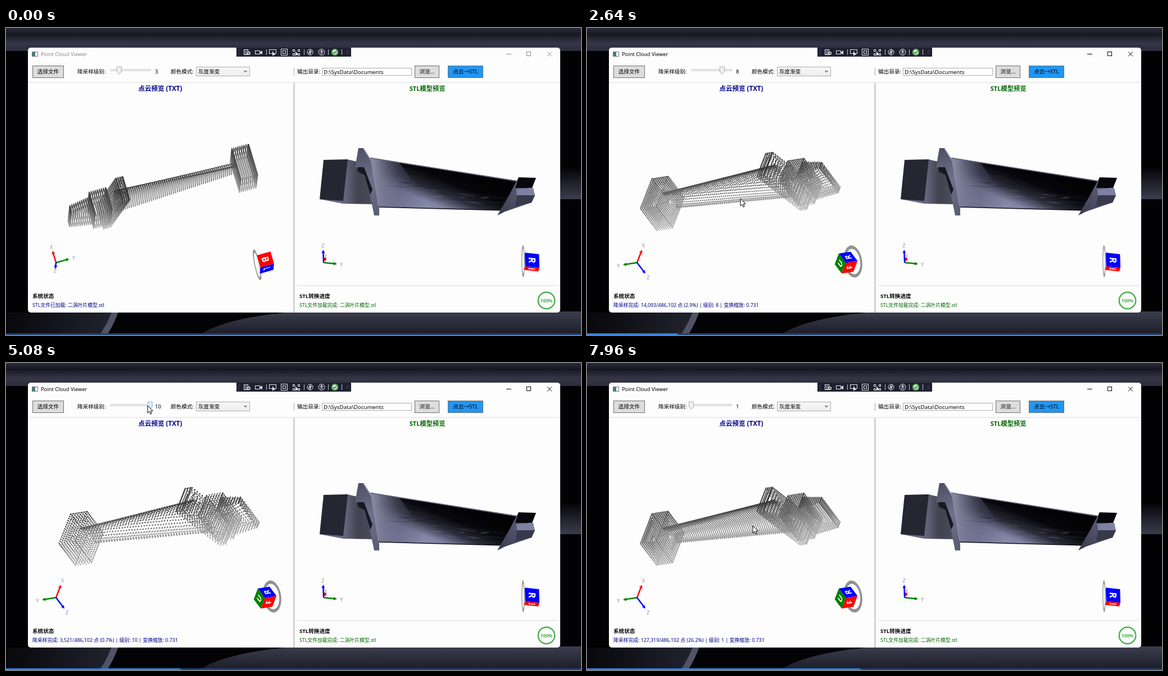
Recreate the animation shown at these times as an HTML page with a canvas. Size 1023 by 547 pixels, loop 8 s.

```html
<!DOCTYPE html>
<html lang="zh">
<head>
<meta charset="utf-8">
<title>Point Cloud Viewer</title>
<style>
html,body{margin:0;width:100%;height:100%;overflow:hidden;background:#020204}
canvas{display:block;width:1023px;height:547px}
</style>
</head>
<body>
<canvas id="stage" width="1023" height="547"></canvas>
<script>
let c = document.getElementById('stage').getContext('2d');
const LOOP = 8000, FONT = '"Noto Sans","Noto Sans CJK SC","Noto Sans CJK",sans-serif';
const NAVY = '#00008b', GREEN = '#006400', TAU = Math.PI * 2;

// ---------- helpers ----------
const mix = (a, b, k) => a + (b - a) * k;
const mixAll = (a, b, k) => a.map((v, i) => mix(v, b[i], k));
const clamp = (v, lo, hi) => Math.max(lo, Math.min(hi, v));
const ramp = (t, a, b) => { const k = clamp((t - a) / (b - a), 0, 1); return k * k * (3 - 2 * k); };

function text(s, x, y, size = 9.6, color = '#000', weight = 400, align = 'left') {
  c.font = `${weight} ${size}px ${FONT}`;
  c.textAlign = align;
  c.fillStyle = color;
  c.fillText(s, x, y);
}
function path(p, closed = true) {
  c.beginPath();
  for (let i = 0; i < p.length; i += 2) c.lineTo(p[i], p[i + 1]);
  if (closed) c.closePath();
}
function poly(p, fill) { path(p); c.fillStyle = fill; c.fill(); }
function line(p, color, w = 1) {
  path(p, false);
  c.strokeStyle = color; c.lineWidth = w; c.stroke();
}
function rect(x, y, w, h, fill) { c.fillStyle = fill; c.fillRect(x, y, w, h); }
function frame(x, y, w, h, color) {
  c.strokeStyle = color; c.lineWidth = 1;
  c.strokeRect(x + .5, y + .5, w - 1, h - 1);
}
function box(x, y, w, h, fill, edge) { rect(x, y, w, h, fill); frame(x, y, w, h, edge); }
function circle(x, y, r, color, w) {
  c.beginPath(); c.arc(x, y, r, 0, TAU);
  c.strokeStyle = c.fillStyle = color;
  if (w) { c.lineWidth = w; c.stroke(); } else c.fill();
}
function grad(x0, y0, x1, y1, ...cols) {
  const g = c.createLinearGradient(x0, y0, x1, y1);
  cols.forEach((v, i) => g.addColorStop(i / (cols.length - 1), v));
  return g;
}

// ---------- timeline ----------
// stops of the pointer: leave time, arrive time, x, y
const MOVES = [[60, 800, 205, 77], [1280, 1600, 244, 78], [2120, 2560, 273, 304], [2680, 3320, 248, 215],
  [3320, 3640, 225, 54], [3700, 3860, 242, 76], [3860, 4080, 252, 76], [5140, 5800, 220, 73],
  [6080, 6480, 182, 73], [6760, 7120, 141, 92], [7200, 7560, 182, 90], [7560, 7960, 295, 290]];
const pointerAt = t => MOVES.reduce((p, [a, b, x, y]) => mixAll(p, [x, y], ramp(t, a, b)), [582, 330]);
// start, end, level and points left of each downsampling run
const RUNS = [[1360, 2040, 8, 14093], [4040, 4600, 10, 3521], [5240, 5640, 7, 24305], [5760, 6200, 6, 36517],
  [6280, 6680, 1, 127319]];
const TOTAL = 486102;
const sliderLevel = t => Math.round(3 + 5 * ramp(t, 1280, 1600) + 2 * ramp(t, 3860, 4080)
  - 4 * ramp(t, 5160, 5800) - 5 * ramp(t, 6080, 6480));
const spin = t => t < 4600 ? ramp(t, 2680, 3320) : 0;

// ---------- views: screen vectors of the X, Y and Z axes ----------
const SIDE = [-.25, -.84, .95, -.26, -.05, .45];
const HOME = [.29, -.75, -.82, .13, .49, .65];
const TURNED = [.28, .1, -.85, .45, .44, .88];
const SOLID = [.08, -.25, 1, .1, -.03, -.96];
const project = (m, x, y, z) => [m[0] * x + m[2] * y + m[4] * z, m[1] * x + m[3] * y + m[5] * z];
const toward = ([a, b, d, e, g, h]) => [g * e - d * h, a * h - g * b, d * b - a * e];

// ---------- point cloud of a turbine blade along Y ----------
// y range, half thickness in x at both ends, z range, slant of y over z
const BOXES = [[-190, -145, 7, 15, -34, 34, 0], [-145, -110, 25, 25, -34, 34, 0],
  [-110, -95, 28, 28, -58, 42, -.35], [155, 190, 36, 36, -32, 28, 0]];
function square(u) {
  const e = u * 4 % 1 * 2 - 1;
  return [[e, 1], [1, -e], [-e, -1], [-1, e]][u * 4 | 0];
}
function bladePoints(level) {
  const pts = [], dy = 4.2 + Math.max(0, level - 8) * .8, ds = 1.2 + .33 * level;
  const loop = (length, put) => {
    const n = Math.max(4, Math.round(length / ds));
    for (let i = 0; i < n; i++) pts.push(put(i / n));
  };
  for (let y = -95; y < 155; y += dy) {
    const k = (y + 95) / 250, mid = mix(-9, -5, k), half = mix(38, 24, k);
    loop(half * 4, u => {
      const w = Math.cos(u * TAU);
      return [Math.sin(u * TAU) * 4 + 11 * (1 - w * w) + w * 9 * (k - .5), y, mid + half * w];
    });
  }
  for (const [y0, y1, x0, x1, z0, z1, slant] of BOXES) {
    const ring = (k, s) => loop(4 * s * mix(x0, x1, k) + 2 * s * (z1 - z0), u => {
      const [a, b] = square(u), z = (z0 + z1) / 2 + b * s * (z1 - z0) / 2;
      return [a * s * mix(x0, x1, k), mix(y0, y1, k) + slant * z, z];
    });
    for (let y = y0; y <= y1; y += dy) ring((y - y0) / (y1 - y0), 1);
    for (let s = .15; s < 1; s += dy / 36) { ring(0, s); ring(1, s); }
  }
  return pts;
}
function paintCloud(level, m, scale) {
  const n = toward(m), r = 1.25 + level * .075;
  bladePoints(level)
    .map(p => [p, n[0] * p[0] + n[1] * p[1] + n[2] * p[2]])
    .sort((a, b) => a[1] - b[1])
    .forEach(([[x, y, z]]) => {
      const g = Math.round(clamp(115 + 1.3 * z - .5 * x, 45, 172) / 6) * 6;
      const [px, py] = project(m, x * scale, y * scale, z * scale);
      c.fillStyle = `rgb(${g},${g},${g})`;
      c.fillRect(276 + px - r / 2, 291 + py - r / 2, r, r);
    });
}
const layer = document.createElement('canvas');
layer.width = 1023; layer.height = 547;
let layerKey = '';
function cloud(level, m, scale) {
  const key = [level, ...m].join();
  if (key !== layerKey) {
    const main = c;
    c = layer.getContext('2d');
    c.clearRect(0, 0, 1023, 547);
    paintCloud(level, m, scale);
    c = main;
    layerKey = key;
  }
  c.drawImage(layer, 0, 0);
}

// ---------- axes and view cube ----------
function axes(ox, oy, m, size) {
  ['#f00', '#008000', '#00f'].forEach((col, i) => {
    const [dx, dy] = [m[i * 2], m[i * 2 + 1]], len = Math.hypot(dx, dy), tip = size * len;
    const ux = dx / len, uy = dy / len, neck = Math.max(0, tip - 6);
    const at = (d, side) => [ox + ux * d - uy * side, oy + uy * d + ux * side];
    line([ox, oy, ...at(neck, 0)], col, 2.4);
    if (len < .35) circle(...at(tip, 0), 3, col);
    else poly([...at(tip, 0), ...at(neck, 3), ...at(neck, -3)], col);
    const [lx, ly] = at(Math.max(tip * 1.32, 12), 0);
    text('XYZ'[i], lx, ly + 3.5, 9.6, '#999', 400, 'center');
  });
}
// letter, colour, normal and letter-up direction of each face
const FACES = [['R', '#00f', [1, 0, 0], [0, 1, 0]], ['L', '#00f', [-1, 0, 0], [0, 1, 0]],
  ['U', '#008000', [0, 1, 0], [0, 0, -1]], ['F', '#f00', [0, 0, 1], [0, 1, 0]], ['B', '#f00', [0, 0, -1], [0, 1, 0]]];
const cross = (a, b) => [0, 1, 2].map(i => a[(i + 1) % 3] * b[(i + 2) % 3] - a[(i + 2) % 3] * b[(i + 1) % 3]);
function cube(ox, oy, m) {
  const half = 12.7, eye = toward(m);
  c.beginPath();
  for (const r of [23, 28.5]) {
    for (let i = 0; i <= 48; i++) {
      const a = i / 48 * TAU, [x, y] = project(m, r * Math.cos(a), -15, r * Math.sin(a));
      i ? c.lineTo(ox + x, oy + y) : c.moveTo(ox + x, oy + y);
    }
  }
  c.fillStyle = c.strokeStyle = '#919191'; c.lineWidth = .6;
  c.fill('evenodd'); c.stroke();
  for (const [letter, color, normal, up] of FACES) {
    if (normal.reduce((s, v, i) => s + v * eye[i], 0) <= 0) continue;
    c.save();
    const [x, y] = project(m, ...normal), right = project(m, ...cross(up, normal)), top = project(m, ...up);
    c.transform(right[0], right[1], -top[0], -top[1], ox + x * half, oy + y * half);
    rect(-half, -half, half * 2, half * 2, color);
    text(letter, 0, 6.2, 17, '#fff', 700, 'center');
    c.restore();
  }
}

// ---------- solid model ----------
function model() {
  let seed = 7;
  const rnd = () => (seed = seed * 16807 % 2147483647) / 2147483647;
  poly([558,305, 607,234, 624,238, 642,250, 655,314, 600,313], grad(602, 0, 650, 0, '#666880', '#42434f', '#4a4b5c'));
  poly([565,235, 608,234, 600,308, 558,305], '#242632');
  const foil = [648,231, 915,273, 890,325, 664,319];
  poly(foil, grad(776, 246, 742, 330, '#030305', '#08080c', '#2a2b38', '#8183a4', '#9294b6'));
  c.save();
  path(foil); c.clip();
  poly([648,231, 700,240, 760,325, 664,319], grad(655, 0, 745, 0, '#84869f', 'rgba(80,82,108,.5)', 'rgba(60,62,84,0)'));
  for (let i = 0; i < 60; i++) {
    const k = rnd(), x = mix(665, 860, rnd()), y = mix(250 + (x - 665) * .17, 312, k), len = 15 + rnd() * 55;
    poly([x, y, x + len, y + len * .07, x + len * .6, y + 2.4], k < .5 ? 'rgba(5,5,9,.75)' : 'rgba(128,130,164,.4)');
  }
  c.restore();
  line([648, 231.5, 915, 274], '#62647a', 1.5);
  line([664, 319, 889, 325], '#101018', 1.5);
  poly([627,214, 636,214, 650,236, 664,317, 664,334, 655,334, 638,252, 621,248],
    grad(620, 214, 664, 330, '#4b4d61', '#6f718b', '#5b5d75'));
  poly([625,248, 637,248, 652,288, 648,297, 638,262, 626,256], '#171820');
  line([636, 215, 650, 237, 663, 317], '#8c8eae', 1.5);
  poly([912,266, 941,298, 935,311, 888,327, 874,334, 895,298], grad(880, 330, 925, 285, '#3b3c4e', '#5e607c'));
  poly([912,266, 943,267, 936,285, 906,285], '#08080c');
  poly([908,287, 938,285, 941,298, 909,298], '#7f81a2');
  poly([909,298, 941,298, 935,311, 906,318], '#38394a');
}

// ---------- desktop and window ----------
function desktop() {
  rect(0, 0, 1023, 547, '#020204');
  rect(0, 0, 1023, 13, grad(0, 0, 0, 13, '#2a2c3a', '#14151d'));
  rect(0, 13, 1023, 28, grad(0, 13, 0, 41, '#1b1c27', '#343646', '#2b2d3b'));
  rect(986, 250, 37, 55, grad(0, 250, 0, 305, '#050508', '#3b3d4e'));
  rect(0, 507, 190, 40, grad(0, 0, 185, 0, '#08080c', '#20222d'));
  c.beginPath(); c.moveTo(196, 500); c.quadraticCurveTo(188, 525, 172, 549);
  c.lineTo(360, 549); c.quadraticCurveTo(400, 515, 520, 500);
  c.fillStyle = '#030305'; c.fill();
  c.beginPath(); c.moveTo(196, 500); c.quadraticCurveTo(188, 525, 172, 549);
  c.strokeStyle = '#515366'; c.lineWidth = 11; c.stroke();
  c.beginPath(); c.moveTo(340, 549); c.quadraticCurveTo(390, 515, 520, 505);
  c.lineTo(1023, 505); c.lineTo(1023, 549);
  c.fillStyle = grad(0, 507, 0, 547, '#3a3c4c', '#1b1c27'); c.fill();
}
function debugBar() {
  const w = '#e8e8ee', arrow = x => poly([x, 41, x, 50, x + 2, 48, x + 5, 48], w);
  rect(410, 35, 204, 16, '#1f2030');
  for (let y = 38; y < 49; y += 2) rect(413 + (y / 2 % 2) * 2, y, 1, 1, '#666879');
  frame(423, 38, 8, 10, w);
  for (let y = 41; y < 47; y += 2.5) line([425, y, 429, y], w);
  circle(432, 45, 2.2, w, 1.5);
  frame(443, 40, 9, 7, w); poly([452,43, 456,40, 456,47, 452,45], w);
  for (const x of [463.5, 530.5, 573.5, 597.5]) line([x, 38, x, 48], '#c8c8d0');
  frame(468, 38, 13, 8, w); arrow(474);
  frame(489, 37, 12, 12, w); frame(492, 40, 6, 6, w);
  for (let i = 0; i < 4; i++) frame(510 + i % 2 * 9, 38 + (i >> 1) * 7, 4, 4, w);
  arrow(515);
  circle(541, 43, 5, w, 1); line([538, 46, 541, 40, 541, 46, 544, 40], w, 1.2);
  circle(561.5, 43, 5.5, w, 1); circle(561.5, 40, 1.2, w);
  line([558, 41.8, 565, 41.8], w); line([559.5, 47, 561.5, 42, 563.5, 47], w);
  circle(585, 43, 6, '#d9f0d6'); circle(585, 43, 5, '#3b9c3b', 1.6);
  line([582, 43, 584.2, 45.4, 588, 40.8], '#247a24', 1.6);
  line([609, 40, 606, 43, 609, 46], '#555768');
}
function button(x, w, label, fill = '#ddd', off = false) {
  box(x, 67, w, 22, off ? '#f4f4f4' : fill, off ? '#adb2b5' : '#707070');
  text(label, x + w / 2, 81.3, 9.6, off ? '#838383' : '#000', 400, 'center');
}
const thumbX = level => 185.5 + (level - 1) * 7.85;
function slider(level, hot) {
  const x = thumbX(level);
  box(186, 73, 72, 4, '#e7eaea', '#d6d6d6');
  path([x - 4, 69, x + 4, 69, x + 4, 78, x, 82.5, x - 4, 78]);
  c.fillStyle = hot ? '#dcecfc' : '#f0f0f0'; c.fill();
  c.strokeStyle = hot ? '#7eb4ea' : '#acacac'; c.lineWidth = 1; c.stroke();
}
function windowFrame(active) {
  const ink = active ? '#000' : '#8a8a8a';
  c.beginPath(); c.roundRect(39, 35, 947, 472, 5);
  c.fillStyle = '#fdfdfd'; c.fill();
  box(46, 42, 11, 9, '#fff', '#777'); rect(47, 43, 5, 7, '#3e7d8c');
  text('Point Cloud Viewer', 62, 50, 9.3, ink);
  line([890, 46.5, 899, 46.5], ink);
  frame(926, 42, 8, 8, ink);
  line([963, 42.5, 971, 50.5], ink); line([971, 42.5, 963, 50.5], ink);
  line([39, 97, 986, 97], '#dcdcdc');
  rect(511, 98, 3, 409, '#d3d3d3');
  line([512.5, 71, 512.5, 85], '#aaa');
  line([518, 459, 982, 459], '#d8d8d8');
}
function controls(level, hot, busy) {
  button(47, 56, '选择文件', '#ddd', busy);
  text('降采样级别:', 127, 81.3);
  slider(level, hot);
  text(level, 265, 81.3);
  text('颜色模式:', 293, 81.3);
  box(338, 69, 96, 17, grad(0, 69, 0, 86, '#f7f7f7', '#eee'), '#acacac');
  text('灰度渐变', 342, 81.3);
  line([423.5, 76, 426, 78.5, 428.5, 76], '#555', 1.2);
  text('输出目录:', 518, 81.3);
  box(562, 71, 160, 14, '#fff', '#abadb3');
  text('D:\\SysData\\Documents', 565, 81.5, 9.8);
  button(727, 44, '浏览...');
  button(786, 63, '点云→STL', '#2196f3');
}
function labels(run, busy) {
  text('点云预览 (TXT)', 274.5, 112.3, 11.5, NAVY, 700, 'center');
  text('STL模型预览', 749.5, 112.3, 11.2, GREEN, 700, 'center');
  text('系统状态', 47, 481.3, 9.6, '#000', 700);
  let status = 'STL文件已加载: 二涡叶片模型.stl';
  if (busy) status = '正在应用降采样...';
  else if (run) {
    const [, , level, n] = run, part = (n / TOTAL * 100).toFixed(1);
    status = `降采样完成: ${n.toLocaleString('en')}/${TOTAL.toLocaleString('en')} 点 (${part}%) | 级别: ${level} | 变换缩放: 0.731`;
  }
  text(status, 47, 496.5, 8.8, NAVY);
  text('STL转换进度', 522, 481.3, 9.6, '#000', 700);
  text('STL文件加载完成: 二涡叶片模型.stl', 522, 496.5, 8.8, GREEN);
  circle(961.5, 485.5, 14.8, '#4caf50', 2.4);
  text('100%', 961.5, 488.6, 8.2, '#4caf50', 700, 'center');
}
function pointer(x, y) {
  path([0,0, 0,13, 3,10.3, 5,15, 7.2,14, 5.2,9.5, 9.2,9.2].map((v, i) => v + (i % 2 ? y : x)));
  c.fillStyle = '#fff'; c.fill();
  c.strokeStyle = '#000'; c.lineWidth = 1; c.stroke();
}

function draw(t) {
  const [x, y] = pointerAt(t), level = sliderLevel(t), k = spin(t);
  const busy = RUNS.some(([a, b]) => t >= a && t < b);
  const run = RUNS.filter(r => t >= r[1]).pop();
  const hot = t > 60 && Math.abs(x - thumbX(level)) < 6 && y > 68 && y < 83;
  const view = run ? mixAll(HOME, TURNED, k) : SIDE;
  desktop();
  windowFrame(t >= 1280);
  debugBar();
  controls(level, hot, busy);
  labels(run, busy);
  cloud(run ? run[2] : 3, view, run ? 1 : .9);
  model();
  axes(89, 418 + k, view, run ? mix(30.5, 27, k) : 25);
  cube(461, 418, view);
  axes(565, 418, SOLID, 24);
  cube(935, 417, SOLID);
  rect(0, 544, 1023, 3, '#1f4274');
  rect(0, 544, t * .0611, 3, '#2f7fe0');
  if (t > 60) pointer(x, y);
}
const start = performance.now();
function tick() {
  const t = (performance.now() - start) % LOOP;
  draw(Math.floor(t / 40) * 40);
  requestAnimationFrame(tick);
}
tick();
</script>
</body>
</html>
```
